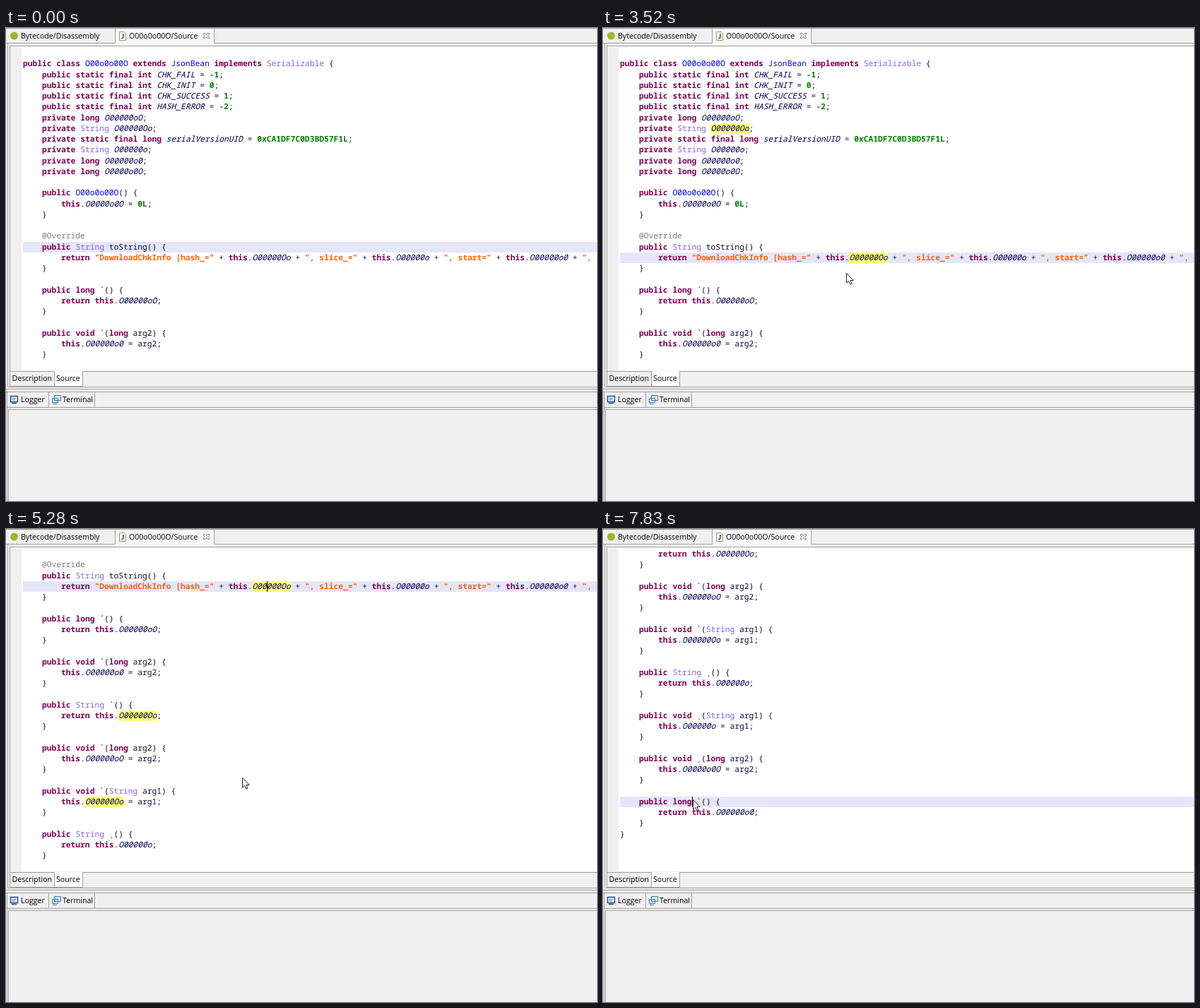
Recreate the animation shown at these times as an HTML page. Size 836 px wide and 670 px high, loop 8 s.

```html
<!DOCTYPE html>
<html lang="en">
<head>
<meta charset="utf-8">
<style>
html, body { margin: 0; width: 100%; height: 100%; overflow: hidden; background: #f0f0f0; }
svg { position: absolute; left: 0; top: 0; }
#ui text { font: 10.6px "Open Sans", "Noto Sans", sans-serif; fill: #000; }
#view { position: absolute; left: 22px; top: 27px; width: 814px; height: 458px; overflow: hidden; background: #fff; }
#code { position: absolute; left: 2px; width: 812px; color: #101038; white-space: pre;
  font: 11.28px/15.25px "Noto Sans Mono", "DejaVu Sans Mono", monospace; text-rendering: geometricPrecision; }
#code div { height: 15.25px; }
#code .cur { background: #e6e6fa; }
#code #caret { position: absolute; width: 1px; background: #000; }
.k { color: #7f0055; }
.t { color: #855ff5; }
.c { color: #0000e6; }
.n { color: #008000; }
.s { color: #ff6000; }
.a { color: #808080; }
i { color: #000050; }
.literal .s:nth-of-type(2) { background: #ffff50; }
.field .O00000Oo { background: #ffff80; }
</style>
</head>
<body>
<svg id="ui" width="836" height="670" fill="none" stroke="#a0a0a0">
  <path fill="#f8f8f8" stroke="none" d="M154 0H294V25H154ZM5 25H836V27H5Z"/>
  <path d="M0 21.5H154.5V0M294.5 0V21.5H836M0 .5H836M2.5 22V508.5H836M836 25.5H5.5V507.5H108.5V486.5H836M5 486.5H68.5V507"/>
  <path fill="#fff" stroke="none" d="M69 486H108V507H69Z"/>
  <path d="M0 511.5H836M0 515.5H836M2 537.5H60M60.5 516V537.5H836M125.5 516V537M1.5 516V670M836 540.5H3.5V670"/>
  <circle cx="11.5" cy="11" r="5.5" fill="#a2b52b" stroke="none"/>
  <path d="M160.5 5.5H167L169.5 8V17.5H160.5Z" fill="#fffdf0" stroke="#a89050"/>
  <path d="M165.8 8V13.2Q165.5 15 163 14.2" stroke="#2458a8" stroke-width="1.6"/>
  <path d="M279.5 7.5H282L283.5 9.5L285 7.5H287.5V9L285.5 11L287.5 13V14.5H285L283.5 12.5L282 14.5H279.5V13L281.5 11L279.5 9Z" stroke="#808080"/>
  <path d="M6.5 521.5H16.5V529.5H6.5ZM8 531.5H15" fill="#e4f1fc" stroke="#234b7d" stroke-width="1.4"/>
  <path d="M8.5 524.5H14M8.5 526.5H13" stroke="#5689bd"/>
  <path d="M68.5 520.5H77.5V527.5H68.5ZM65.5 524.5H73.5V530.5H65.5ZM66 532.5H72" fill="#dcecfa" stroke="#4377b5"/>
  <g stroke="none">
    <text x="21" y="15">Bytecode/Disassembly</text>
    <text x="174" y="15">O00o0o00O/Source</text>
    <text x="8.5" y="500">Description</text>
    <text x="71" y="500">Source</text>
    <text x="21" y="530">Logger</text>
    <text x="80" y="530">Terminal</text>
  </g>
</svg>
<div id="view"><div id="code"></div></div>
<svg id="pointer" width="12" height="18" overflow="visible">
  <path d="M.5 .5V14.2L3.6 11.3L5.8 16.3L8 15.3L5.8 10.5H10.2Z" fill="#fff" stroke="#222"/>
</svg>
<script>
const ROW = 15.25, COL = 6.768, LOOP = 8000;
const method = (head, body) => `    public ${head} {\n        ${body};\n    }\n`;
const text = `
public class O00o0o00O extends JsonBean implements Serializable {
    public static final int CHK_FAIL = -1;
    public static final int CHK_INIT = 0;
    public static final int CHK_SUCCESS = 1;
    public static final int HASH_ERROR = -2;
    private long O00000oO;
    private String O00000Oo;
    private static final long serialVersionUID = 0xCA1DF7C0D3BD57F1L;
    private String O00000o;
    private long O00000o0;
    private long O0000o0O;

` + [
  method('O00o0o00O()', 'this.O0000o0O = 0L'),
  '    @Override\n' + method('String toString()', 'return "DownloadChkInfo [hash_=" + this.O00000Oo + ", slice_=" + this.O00000o + ", start=" + this.O00000o0 + ", end="'),
  method('long ´()', 'return this.O00000oO'),
  method('void ´(long arg2)', 'this.O00000o0 = arg2'),
  method('String `()', 'return this.O00000Oo'),
  method('void `(long arg2)', 'this.O00000oO = arg2'),
  method('void `(String arg1)', 'this.O00000Oo = arg1'),
  method('String ˎ()', 'return this.O00000o'),
  method('void ˎ(String arg1)', 'this.O00000o = arg1'),
  method('void ˏ(long arg2)', 'this.O0000o0O = arg2'),
  method('long `()', 'return this.O00000o0')
].join('\n') + '}';

const rules = [
  ['b', 's', '"[^"]*"'],
  ['b', 'k', '\\b(?:public|private|static|final|class|extends|implements|int|long|void|return|this)\\b'],
  ['span', 't', '\\b(?:String|Serializable)\\b'],
  ['span', 'c', 'O00o0o00O|JsonBean'],
  ['i', '', '\\b(?:O0000\\w+|CHK_\\w+|HASH_ERROR|serialVersionUID)'],
  ['b', 'n', '-?\\b\\d\\w*'],
  ['span', 'a', '@\\w+']
];
const lexer = new RegExp(rules.map(r => `(${r[2]})`).join('|'), 'g');
const paint = line => line.replace(lexer, (word, ...groups) => {
  const [tag, name] = rules[groups.findIndex(g => g !== undefined)];
  return `<${tag} class="${name || word}">${word}</${tag}>`;
});

const code = document.getElementById('code');
const pointer = document.getElementById('pointer');
code.innerHTML = text.split('\n').map(l => `<div>${paint(l)}</div>`).join('') + '<div id="caret"></div>';
const caret = document.getElementById('caret');
const rows = [...code.children];

// time, line, column, highlight
const clicks = [[0, 18, -1, ''], [1860, 19, 20, 'literal'], [2900, 19, 51, 'field'], [7830, 54, 15, '']];
// each wheel step moves two lines
const wheel = [3630, 3740, 3960, 4410, 4510, 4840, 5160, 5275, 5380, 5610, 5830, 6050, 6490, 6710, 6930, 7050];
// time, x, y
const path = [
  [310, 751, 628], [750, 300, 314], [860, 209, 380], [1080, 262, 483],
  [1190, 180, 200], [1300, 120, 5], [1410, 71, 90], [1520, 110, 220], [1630, 158, 318],
  [1860, 161, 326], [2390, 161, 326], [2800, 368, 322], [2960, 368, 322], [3170, 355, 335],
  [3280, 344, 347], [5160, 344, 347], [5265, 334, 351.5], [6145, 281.5, 368.5],
  [6380, 277, 371], [7260, 165, 401], [7580, 127, 383], [8000, 127, 383]
];

function pointerAt(t) {
  const n = Math.max(1, path.findIndex(p => p[0] >= t));
  const [a, b] = [path[n - 1], path[n]];
  const u = Math.max(0, (t - a[0]) / (b[0] - a[0]));
  return [a[1] + (b[1] - a[1]) * u, a[2] + (b[2] - a[2]) * u];
}

function draw(t) {
  const [time, line, col, mark] = clicks.filter(c => c[0] <= t).pop();
  const scroll = Math.min(31, 2 * wheel.filter(w => w <= t).length);
  code.style.top = 1.2 - scroll * ROW + 'px';
  code.className = mark;
  rows.forEach((r, i) => r.classList.toggle('cur', i === line));
  caret.style.left = Math.round(col * COL) + 'px';
  caret.style.top = line * ROW + 'px';
  caret.hidden = col < 0 || Math.floor((t - time) / 530) % 2 === 1;

  // the pointer is sampled about nine times a second
  const tick = Math.floor((t - 305) / 110.2);
  const [x, y] = pointerAt(310 + tick * 110.2);
  pointer.style.visibility = tick < 0 ? 'hidden' : 'visible';
  pointer.style.left = Math.round(x) + 'px';
  pointer.style.top = Math.round(y) + 'px';
}

const start = performance.now();
function frame() {
  draw((performance.now() - start) % LOOP);
  requestAnimationFrame(frame);
}
frame();
</script>
</body>
</html>
```
